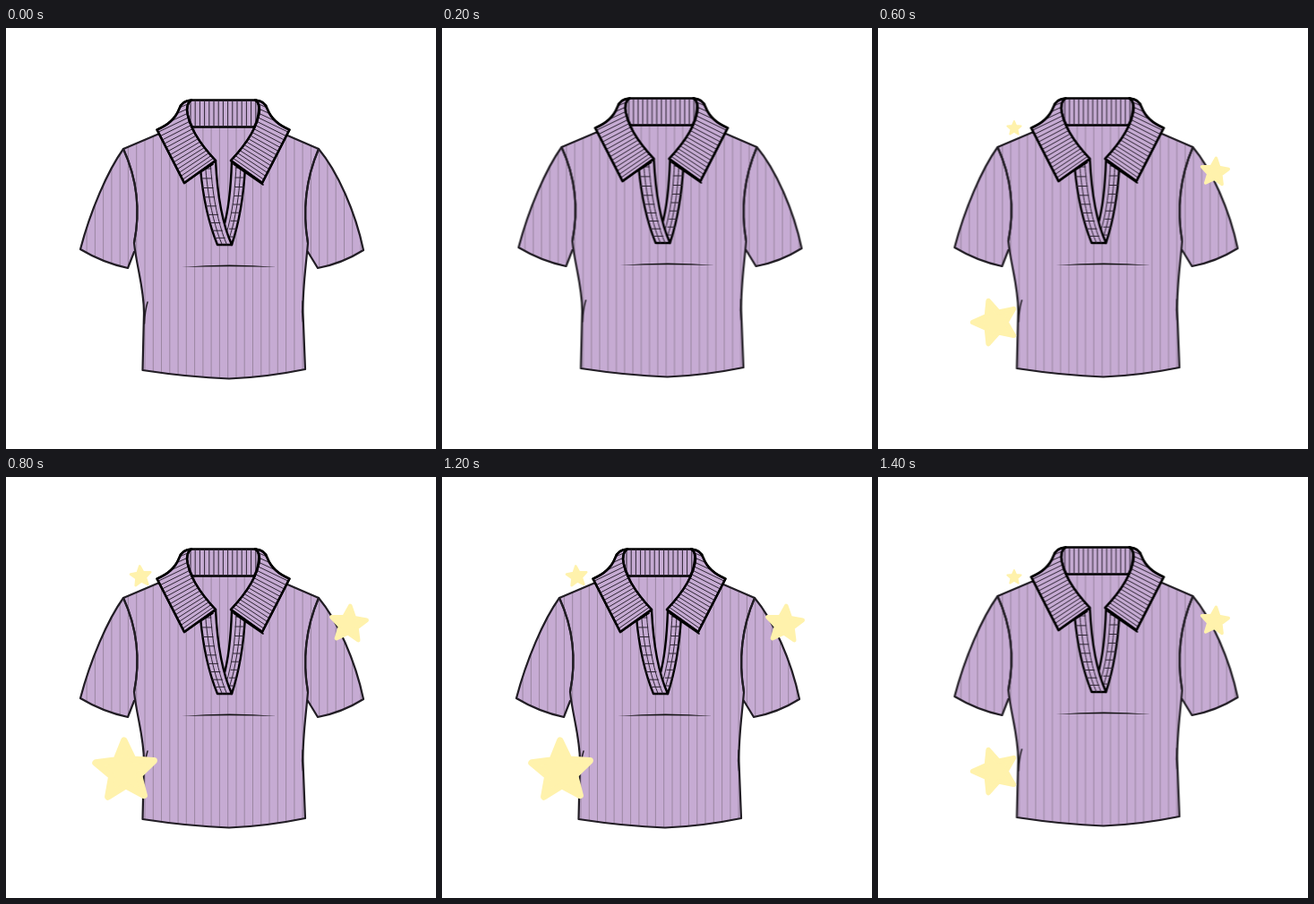
An HTML page for the animation above (1600 ms loop, 480 px wide and 470 px high).

```html
<!DOCTYPE html>
<html lang="en">
<head>
<meta charset="utf-8">
<title>Polo top</title>
<style>
html, body { margin: 0; width: 100%; height: 100%; overflow: hidden; background: #fff; }
svg { display: block; width: 480px; height: 470px; }
path { stroke-linejoin: round; stroke-linecap: round; }
.cloth { fill: #c6abd3; }
.seam { fill: none; stroke: #211d24; stroke-width: 2.2; }
.trim { fill: #c6abd3; stroke: #000; stroke-width: 2.4; }
.edge { fill: none; stroke: #000; stroke-width: 2.4; }
.rib { fill: none; stroke: #9b87a2; stroke-width: 1; }
.fine { fill: none; stroke: #2c2332; stroke-width: 1; }
.star { fill: #fff2ac; stroke: #fff2ac; }
</style>
</head>
<body>
<svg viewBox="0 0 480 470">
  <defs></defs>
  <g id="shirt"></g>
  <g id="large"></g>
  <g id="small"></g>
</svg>
<script>
const STEP = 200, LOOP = 1600;
const shirt = document.getElementById('shirt');
const large = document.getElementById('large');
const small = document.getElementById('small');
const defs = document.querySelector('defs');

function add(parent, tag, attrs = {}) {
  const el = document.createElementNS('http://www.w3.org/2000/svg', tag);
  for (const k in attrs) el.setAttribute(k, attrs[k]);
  parent.append(el);
  return el;
}
const draw = (parent, cls, d, attrs) => add(parent, 'path', { class: cls, d, ...attrs });
function clip(id, ...shapes) {
  const c = add(defs, 'clipPath', { id });
  shapes.forEach(d => add(c, 'path', { d }));
  return { 'clip-path': `url(#${id})` };
}
const mix = (a, b, t) => a + (b - a) * t;
const between = (p, q, t) => p.map((v, i) => mix(v, q[i], t));
const at = p => p.map(v => v.toFixed(1)).join(' ');
const line = pts => 'M' + pts.map(at).join('L');
const range = n => Array.from({ length: n }, (_, i) => i);

function bezier(pts, t) {
  while (pts.length > 1) pts = pts.slice(1).map((p, i) => between(pts[i], p, t));
  return pts[0];
}
function verticals(x0, x1, gap, y0, y1) {
  const n = Math.ceil((x1 - x0) / gap);
  return range(n).map(i => line([[x0 + i * gap, y0], [x0 + i * gap, y1]])).join('');
}

// body and sleeves
const torso = 'M203 100L171 118L131 135C147 170 150 205 143 240C146 268 154 290 154 318L152.500 382' +
  'Q205 390 249 391.500Q290 390 334 381L331.500 318C331 290 335 265 337 240C331 205 334 170 349 135L312 119L282 100Z';
const sleeveL = 'M143 240C150 205 147 170 131 135C113 160 94 205 83 247Q108 262 136 268L143 250';
const sleeveR = 'M337 240C331 205 334 170 349 135C370 160 390 205 399 248Q375 263 348 268L337 250';
const parts = [torso, sleeveL, sleeveR];
parts.forEach(d => draw(shirt, 'cloth', d));
draw(shirt, 'rib', verticals(90.1, 400, 9.27, 80, 395), clip('cloth', ...parts));
parts.forEach(d => draw(shirt, 'seam', d));
draw(shirt, 'cloth', 'M196 267Q250 262 302 267Q250 265.500 196 267Z', { style: 'fill:#111' });
draw(shirt, 'seam', 'M158 306Q155 316 154.500 330M331 305Q330 317 331.500 328', { style: 'stroke-width:1.5' });

// back neck
const band = 'M207 80.500H279Q283 84 282 93Q281 103 277 110.500H208Q203 101 202 92Q202 83 207 80.500Z';
draw(shirt, 'trim', band);
draw(shirt, 'fine', verticals(206, 282, 5.2, 81, 110), clip('band', band));

// placket strips: ribs along, stitches across
function placket(outer, inner) {
  const back = [...inner].reverse();
  const [a, ...b] = outer, [c, ...d] = back;
  draw(shirt, 'trim', `M${at(a)}C${b.map(at)}L${at(c)}C${d.map(at)}Z`);
  const spot = (t, k) => between(bezier(outer, t), bezier(inner, t), k);
  for (const k of [.33, .66]) draw(shirt, 'fine', line(range(11).map(i => spot(i / 10, k))));
  for (const i of range(9)) {
    const [x, y] = spot(i / 9, 0);
    draw(shirt, 'fine', line([[x, y], [spot(i / 9, .7)[0], y]]));
  }
}
placket([[267, 156], [265, 190], [261, 215], [252, 242]], [[252, 149], [251, 180], [248, 205], [243, 222]]);
placket([[217, 157], [220, 190], [227, 220], [236, 242]], [[234, 148], [236, 190], [243, 222], [252, 242]]);

// collar leaf, drawn once and mirrored
const leaf = 'M168.500 113.500C182 108 189 101 193 91Q196 81 207 80.500Q202 83 202 92C204 112 219 132 234 148L199 173Z';
const neck = [[202, 80], [202, 112], [219, 132], [234, 148]];
const leafClip = clip('leaf', leaf);
function collar(transform) {
  const g = add(shirt, 'g', { transform });
  draw(g, 'trim', leaf);
  const ribs = range(17).map(i => {
    const t = (i + 1) / 18, [x, y] = bezier(neck, t), a = mix(.4, .62, t);
    return line([[x, y], [x - 60 * Math.cos(a), y + 60 * Math.sin(a)]]);
  });
  draw(g, 'fine', ribs.join(''), leafClip);
  draw(g, 'edge', leaf);
  draw(g, 'edge', 'M231 152L217 161', { style: 'stroke-width:1.8' });
}
collar('');
collar('translate(485 0) scale(-1 1)');
draw(shirt, 'edge', 'M258 155L287 175', { style: 'stroke-width:1.6' });

// rounded star: centre, reach, tilt in degrees
function star(parent, x, y, r, tilt) {
  const round = r * .2;
  const pts = range(10).map(i => {
    const a = (tilt - 90 + i * 36) * Math.PI / 180;
    const d = i % 2 ? r * .42 : r - round / 2;
    return [x + d * Math.cos(a), y + d * Math.sin(a)];
  });
  draw(parent, 'star', line(pts) + 'Z', { 'stroke-width': round });
}
star(large, 133, 328.5, 38, -2);
star(large, 150.5, 111, 13, -6);
star(large, 382.5, 164.5, 23, 5);
star(small, 131, 328.5, 28, -18);
star(small, 152, 112, 9, 0);
star(small, 376, 161, 17.5, 5);

const start = document.timeline.currentTime || 0;
function play(el, prop, values) {
  const frames = [...values, values[0]].map((v, i) => ({ [prop]: v, offset: i / values.length, easing: 'step-end' }));
  el.animate(frames, { duration: values.length * STEP, iterations: Infinity }).startTime = start;
}
// the shirt hops every beat; stars join from the third beat on
const beats = range(LOOP / STEP);
play(shirt, 'transform', ['translate(0px, 0px)', 'translate(2.5px, -2px)']);
play(large, 'opacity', beats.map(i => i > 1 && i % 2 === 0 ? 1 : 0));
play(small, 'opacity', beats.map(i => i > 1 && i % 2 === 1 ? 1 : 0));
</script>
</body>
</html>
```
